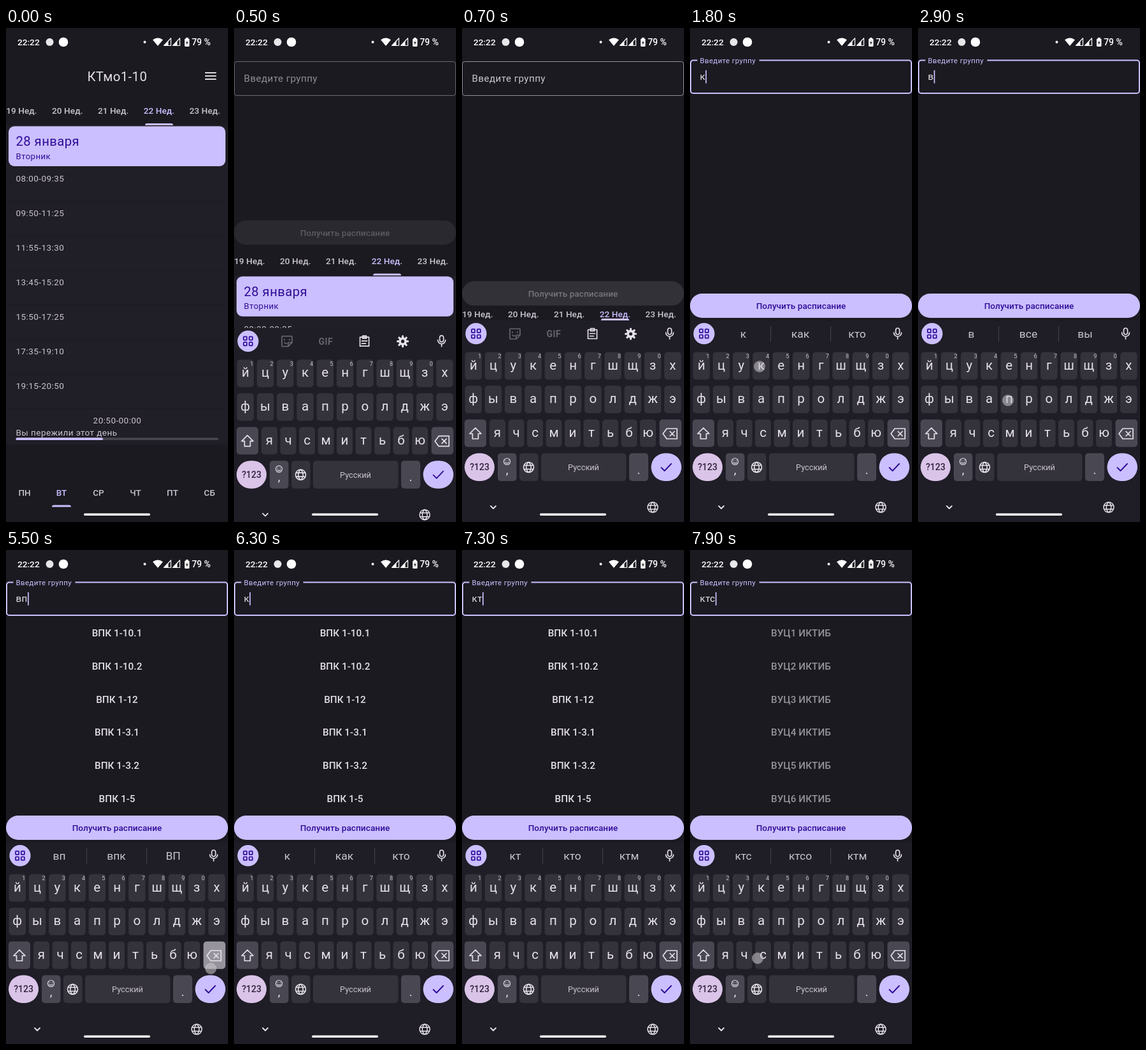
Write an HTML page with a canvas that moves like this. It is 348 by 772 pixels and loops after 8000 ms.

```html
<!DOCTYPE html>
<html lang="ru">
<head>
<meta charset="utf-8">
<title>Расписание</title>
<style>
html, body { margin: 0; width: 100%; height: 100%; overflow: hidden; background: #1b1a21; }
canvas { display: block; width: 348px; height: 772px; }
</style>
</head>
<body>
<canvas id="stage"></canvas>
<script>
const W = 348, H = 772, LOOP = 8000, KB_TOP = 457;
const BG = '#1b1a21', ACCENT = '#cbbfff', INK = '#2f0c97', LIGHT = '#e6e1e9', SOFT = '#cac5cf';
const KEY = '#34323b', KEY_ALT = '#494752', KB_BG = '#1f1d26';

const canvas = document.getElementById('stage');
const dpr = window.devicePixelRatio || 1;
canvas.width = W * dpr;
canvas.height = H * dpr;
const c = canvas.getContext('2d');

const clamp = v => Math.max(0, Math.min(1, v));
const lerp = (a, b, k) => a + (b - a) * k;
const ramp = (t, a, b) => clamp((t - a) / (b - a));
const easeOut = k => 1 - (1 - k) ** 3;

// [time, typed text, three suggestions]
const EDITS = [
  [1200, ''],
  [1700, 'к', 'к', 'как', 'кто'],
  [2300, ''],
  [2600, 'в', 'в', 'все', 'вы'],
  [3000, 'вп', 'вп', 'впк', 'ВП'],
  [3500, 'впк', 'впк', 'ВПК', 'впку'],
  [5500, 'вп', 'вп', 'впк', 'ВП'],
  [5700, 'в', 'в', 'все', 'вы'],
  [5900, ''],
  [6200, 'к', 'к', 'как', 'кто'],
  [7200, 'кт', 'кт', 'кто', 'ктм'],
  [7800, 'ктс', 'ктс', 'ктсо', 'ктм']
];

// [from, to, x, y]
const TOUCHES = [
  [100, 300, 320, 75], [1700, 1900, 109, 529], [2200, 2400, 320, 646],
  [2500, 2700, 80, 583], [2900, 3100, 141, 582], [3400, 3600, 110, 529],
  [5300, 5600, 321, 654], [5700, 5800, 321, 654], [5900, 6000, 321, 654],
  [6100, 6300, 110, 529], [7100, 7300, 202, 635], [7700, 8000, 106, 638]
];

const VPK = ['10.1', '10.2', '12', '3.1', '3.2', '5'].map(n => 'ВПК 1-' + n);
const VUC = [1, 2, 3, 4, 5, 6].map(n => `ВУЦ${n} ИКТИБ`);
const TIMES = ['08:00-09:35', '09:50-11:25', '11:55-13:30', '13:45-15:20',
  '15:50-17:25', '17:35-19:10', '19:15-20:50'];

// y is the middle of the capitals
function text(s, x, y, size, color, o = {}) {
  c.font = `${o.weight || 400} ${size}px ${o.font || 'Roboto'}, sans-serif`;
  c.letterSpacing = (o.gap || 0) + 'px';
  c.textAlign = o.align || 'center';
  c.fillStyle = color;
  c.fillText(s, x, y + size * 0.355);
  return c.measureText(s).width;
}

function box(x, y, w, h, r, color) {
  c.fillStyle = color;
  c.beginPath();
  c.roundRect(x, y, w, h, r);
  c.fill();
}

function disc(x, y, r, color) {
  c.fillStyle = color;
  c.beginPath();
  c.arc(x, y, r, 0, 7);
  c.fill();
}

function icon(d, x, y, color, width = 1.7, fill = false) {
  c.save();
  c.translate(x, y);
  c.lineWidth = width;
  c.lineCap = c.lineJoin = 'round';
  c.strokeStyle = c.fillStyle = color;
  const p = new Path2D(d);
  if (fill) c.fill(p, 'evenodd');
  else c.stroke(p);
  c.restore();
}

function faded(alpha, draw) {
  if (alpha <= 0) return;
  c.save();
  c.globalAlpha *= alpha;
  draw();
  c.restore();
}

function clipped(y0, y1, draw) {
  c.save();
  c.beginPath();
  c.rect(0, y0, W, Math.max(0, y1 - y0));
  c.clip();
  draw();
  c.restore();
}

function statusBar() {
  text('22:22', 35.3, 22, 13.7, '#fff', { weight: 500 });
  disc(68.5, 22, 6, '#e8e8ea');
  disc(90, 22, 7.3, '#fff');
  disc(217.5, 22, 2, '#fff');
  icon('M-8-3.5Q0-9.5 8-3.5L0 6Z', 238, 22, '#fff', 1, true);
  for (const x of [247.5, 261.5]) {
    icon('M0 5.5L11 -6V5.5Z', x, 22, '#fff', 1.2);
    icon('M0 5.5L7 -1.8V5.5Z', x, 22, '#fff', 1, true);
  }
  box(280, 16.5, 7.5, 12.5, 1.5, '#fff');
  box(282, 15, 3.5, 2, 0.5, '#fff');
  icon('M.8-4L-2 .8H0L-.8 4L2-.8H0Z', 283.8, 23, BG, 1, true);
  text('79 %', 306, 22, 14, '#fff', { weight: 500 });
}

function weekTabs(top, bottom) {
  const y = (top + bottom) / 2 - 0.5;
  [19, 20, 21, 22, 23].forEach((n, i) => {
    text(n + ' Нед.', 24.5 + 71.8 * i, y, 13.54, n === 22 ? ACCENT : SOFT, { weight: 500, gap: 0.085 });
  });
  box(218, bottom - 3, 44, 3, [3, 3, 0, 0], ACCENT);
}

function schedule(top) {
  c.save();
  c.translate(0, top - 108);
  box(0, 152, W, 499, 0, '#201e26');
  box(4, 153.5, 340, 62.5, 9, ACCENT);
  text('28 января', 15.5, 177, 20.3, INK, { align: 'left', gap: 0.42 });
  text('Вторник', 15.5, 200, 13.2, INK, { align: 'left', gap: 0.42 });
  TIMES.forEach((s, i) => {
    const y = 235.5 + 54 * i;
    text(s, 15.5, y, 13.54, SOFT, { align: 'left', gap: 0.42 });
    box(0, y + 35, W, 1, 0, '#1b1a21');
  });
  text('20:50-00:00', 174.5, 613.5, 13.54, SOFT, { gap: 0.42 });
  text('Вы пережили этот день', 15.5, 632, 13.54, SOFT, { align: 'left', gap: 0.42 });
  box(15.5, 640.3, 317.5, 3.8, 2, '#47454f');
  box(15.5, 640.3, 136.5, 3.8, 2, ACCENT);
  c.restore();
}

function dayTabs() {
  box(0, 695, W, 77, 0, BG);
  ['ПН', 'ВТ', 'СР', 'ЧТ', 'ПТ', 'СБ'].forEach((s, i) => {
    text(s, 29 + 58 * i, 726.5, 13.54, i === 1 ? ACCENT : SOFT, { weight: 500 });
  });
  box(72, 745.5, 30, 3, [3, 3, 0, 0], ACCENT);
}

function titleBar() {
  text('КТмо1-10', 174.3, 76, 20.3, LIGHT, { gap: 0.42 });
  for (const y of [69, 74, 79]) box(312, y, 17.5, 1.9, 0, LIGHT);
}

function field(focus, value, caret) {
  const y = lerp(52.5, 50.5, focus), h = lerp(53, 51.5, focus);
  c.strokeStyle = focus > 0 ? ACCENT : '#938f99';
  c.lineWidth = 1 + focus;
  c.beginPath();
  c.roundRect(0.5 + focus / 2, y, 347 - focus, h, 4);
  c.stroke();
  if (focus > 0.3) box(11.5, y - 2, 97 * focus, 4, 0, BG);
  text('Введите группу', 15.5, lerp(79, 51, focus), lerp(15.23, 11.5, focus),
    focus > 0 ? ACCENT : SOFT, { align: 'left', gap: lerp(0.42, 0.34, focus) });
  const w = value ? text(value, 15.5, 76, 15.23, LIGHT, { align: 'left', gap: 0.42 }) : 0;
  if (caret) box(15.7 + w, 66, 1.7, 20.5, 0, ACCENT);
}

function button(y, on) {
  box(0, y - 19, W, 38, 19, on ? ACCENT : '#333138');
  text('Получить расписание', 174, y + 0.5, 13.54, on ? INK : '#77747d', { weight: 500, gap: 0.085 });
}

function results(t) {
  const start = t >= 7800 ? 7800 : t >= 6500 ? 6500 : 3400;
  const alpha = start === 6500 ? ramp(t, 6300, 6800) : ramp(t, start - 100, start + 230);
  faded(alpha, () => (start === 7800 ? VUC : VPK).forEach((s, i) => {
    text(s, 174, 129.5 + 51.8 * i, 15.23, LIGHT, { weight: 500, gap: 0.085 });
  }));
}

const GLOBE = 'M-8 0A8 8 0 1 1 8 0A8 8 0 1 1-8 0M-7-3H7M-7 3H7M0-8C-5-4-5 4 0 8C5 4 5-4 0-8';

function toolbar(words) {
  disc(22, 477.7, 16.6, ACCENT);
  for (const dx of [-4.4, 4.4]) for (const dy of [-4.4, 4.4]) {
    c.strokeStyle = INK;
    c.lineWidth = 1.7;
    c.beginPath();
    c.roundRect(22 + dx - 2.6, 477.7 + dy - 2.6, 5.2, 5.2, 1);
    c.stroke();
  }
  icon('M-3-5A3 3 0 0 1 3-5V-1A3 3 0 0 1-3-1Z', 325.5, 477, LIGHT, 1.7);
  icon('M-6-1A6 6 0 0 0 6-1M0 5V9', 325.5, 477, LIGHT, 1.7);
  if (words.length) {
    words.forEach((s, i) => text(s, [83.5, 173, 262][i], 478, 17.4, SOFT));
    for (const x of [126, 220]) box(x, 466, 1, 24, 0, '#46444e');
    return;
  }
  const dim = '#67646d';
  icon('M-7-8H7Q8-8 8-7V2L2 8H-7Q-8 8-8 7V-7Q-8-8-7-8M8 2H3Q2 2 2 3V8M-4-3V-2M4-3V-2M-4 2Q-2 4 0 3', 83, 478, dim);
  text('GIF', 143.8, 478, 14, dim, { weight: 700, gap: 0.5 });
  icon('M-7-6H7V8H-7ZM-3-8H3V-4H-3ZM-4 0H4M-4 4H2', 204.5, 477.5, LIGHT);
  let gear = '';
  for (let i = 0; i < 8; i++) {
    const a = i * Math.PI / 4;
    gear += `M0 0L${8 * Math.sin(a)} ${8 * Math.cos(a)}`;
  }
  icon(gear, 264.5, 478, LIGHT, 3.2);
  disc(264.5, 478, 6.3, LIGHT);
  disc(264.5, 478, 2.6, KB_BG);
}

function letters(row, x0, step, y, w, digits) {
  [...row].forEach((s, i) => {
    const x = x0 + step * i;
    box(x - w / 2, y, w, 43, 5, KEY);
    text(s, x, y + 20, 20.5, LIGHT);
    if (digits && i < 10) text((i + 1) % 10, x + 10, y + 6.5, 9, SOFT);
  });
}

function keyboard(words, erasing) {
  box(0, KB_TOP, W, H - KB_TOP, 0, KB_BG);
  toolbar(words);
  letters('йцукенгшщзх', 17.8, 31.25, 506.5, 26.5, true);
  letters('фывапролджэ', 17.8, 31.25, 559, 26.5);
  letters('ячсмитьбю', 55.5, 29.5, 611.8, 25);

  box(4, 611.8, 34, 43, 5, KEY_ALT);
  icon('M0-9L9 0H4.5V8H-4.5V0H-9Z', 21, 634, LIGHT);
  box(309.5, 611.8, 34.5, 43, 5, erasing ? '#96939c' : KEY_ALT);
  icon('M-5-8H11V8H-5L-11 0ZM0-3.5L7 3.5M7-3.5L0 3.5', 326, 634, LIGHT);

  box(4, 664.5, 47, 43.5, 21.7, '#dac4e8');
  text('?123', 27.5, 686.5, 14, '#30233c', { weight: 500 });
  box(56, 664.5, 29.5, 43.5, 5, KEY_ALT);
  icon('M-5 0A5 5 0 1 1 5 0A5 5 0 1 1-5 0M-2.5 1.3Q0 4 2.5 1.3M-1.8-1.5V-1.2M1.8-1.5V-1.2', 70.5, 677.5, LIGHT, 1.2);
  text(',', 70.5, 690, 19, LIGHT);
  box(90, 664.5, 29.5, 43.5, 5, KEY);
  icon(GLOBE, 104.5, 686.5, LIGHT, 1.6);
  box(124, 664.5, 133.5, 43.5, 5, KEY);
  text('Русский', 190.5, 686.5, 12.7, SOFT);
  box(262, 664.5, 30, 43.5, 5, KEY_ALT);
  text('.', 277, 690, 19, LIGHT);
  box(296.5, 664.5, 47.5, 43.5, 21.7, ACCENT);
  icon('M-7.5 .5L-2.5 5.5L8-5.5', 320, 686.5, INK, 1.9);

  icon('M-4-2L0 2L4-2', 49, 749, LIGHT, 1.8);
  icon(GLOBE, 299, 749, LIGHT, 1.5);
}

function draw(t) {
  c.setTransform(dpr, 0, 0, dpr, 0, 0);
  box(0, 0, W, H, 0, BG);

  // header opens like a damped spring
  const s = Math.max(0, t - 300) / 400 * 4.63;
  const open = t >= 900 ? 1 : 1 - (1 + s) * Math.exp(-s);
  const slide = easeOut(ramp(t, 300, 600));
  const kbTop = lerp(H, KB_TOP, slide);
  const top = lerp(108, KB_TOP, open);
  const edit = EDITS.filter(e => e[0] <= t).pop();
  const value = edit ? edit[1] : '';
  const caret = edit && Math.floor((t - edit[0]) / 500) % 2 === 0;

  if (open < 1) {
    clipped(0, 695, () => schedule(top));
    dayTabs();
    const bottom = Math.min(top + 44, kbTop);
    if (bottom - top > 5) weekTabs(top, bottom);
  }
  faded(1 - ramp(t, 200, 400), titleBar);
  faded(ramp(t, 300, 600), () => clipped(0, top + 1, () => {
    field(easeOut(ramp(t, 900, 1300)), value, caret);
    if (t >= 3400) results(t);
    button(top - 23, value !== '');
  }));

  if (slide > 0) {
    c.save();
    c.translate(0, kbTop - KB_TOP);
    const erasing = TOUCHES.some(k => k[2] > 319 && k[3] > 640 && t >= k[0] + 100 && t < k[1]) || t === 5500;
    keyboard(edit ? edit.slice(2) : [], erasing);
    c.restore();
  }
  statusBar();
  box(122, 758.5, 104, 3.6, 2, '#fff');
  for (const [a, b, x, y] of TOUCHES) {
    if (t >= a && t < b) disc(x, y, 9, 'rgba(205,202,208,.55)');
  }
}

// the screen refreshes ten times a second
const begin = performance.now();
function tick() {
  const t = (performance.now() - begin) % LOOP;
  draw(Math.floor(t / 100) * 100);
  requestAnimationFrame(tick);
}
tick();
</script>
</body>
</html>
```
